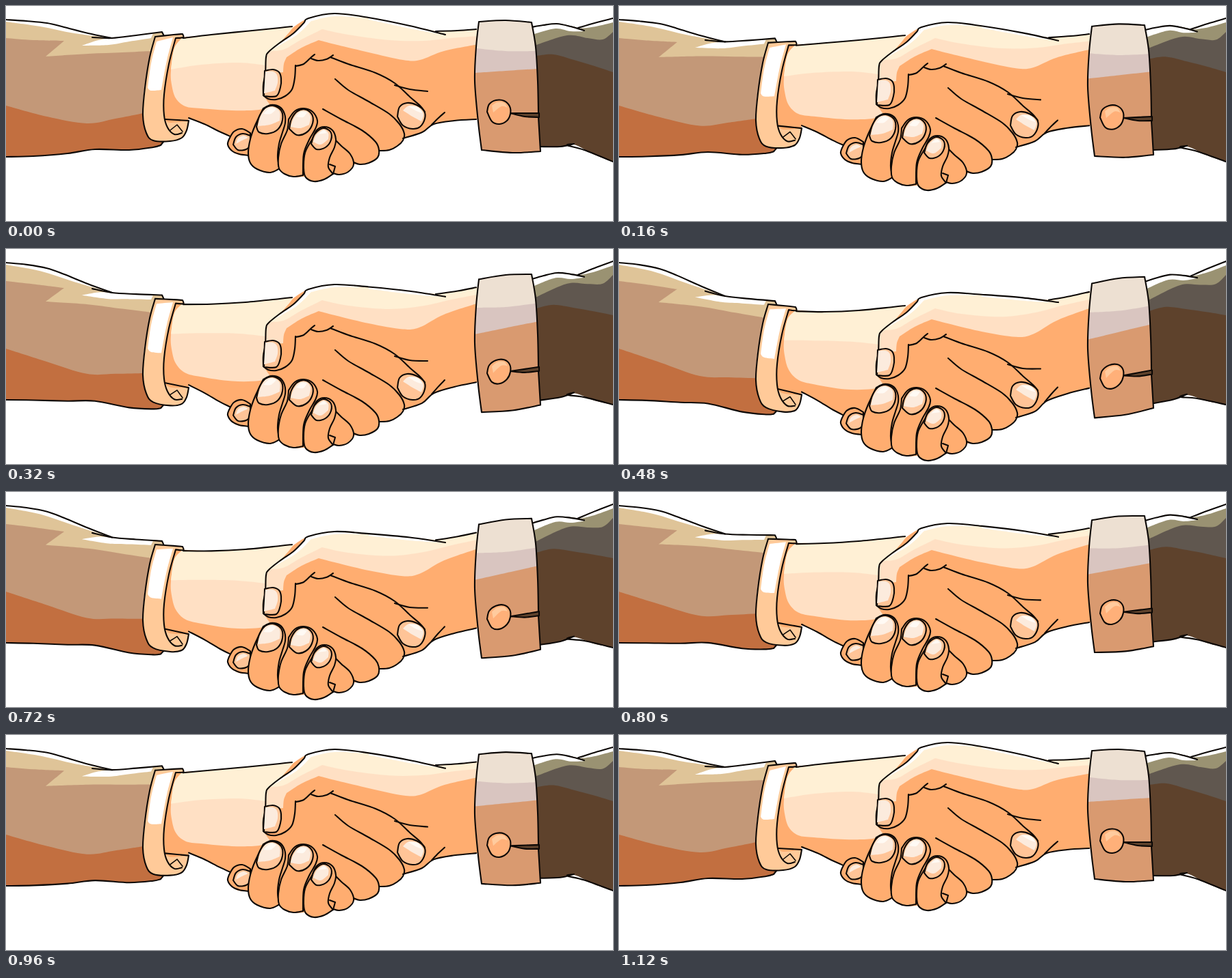
Write an HTML page that moves like this. It is 887 px wide and 315 px high and loops after 1200 ms.

```html
<!DOCTYPE html>
<html lang="en">
<head>
<meta charset="utf-8">
<title>Handshake</title>
<style>
html, body { margin: 0; width: 100%; height: 100%; overflow: hidden; background: #fff; }
svg { display: block; width: 100%; height: 100%; }
path { stroke-linecap: round; stroke-linejoin: round; }
</style>
</head>
<body>
<svg id="stage" viewBox="0 0 887 315"></svg>
<script>
const STEP = 80;
const DROPS = [0, 4, 13, 27, 41, 50, 53, 53, 53, 47, 35, 22, 10, 3, 0];
const stage = document.getElementById('stage');
const shapes = [];
const clamp = v => Math.min(1, Math.max(0, v));

// How strongly a point follows the hands: still at both stage edges, full in the middle.
function follow(x, y) {
  if (x < 350) {
    const k = clamp(x / 350);
    return k * k * (3 - 2 * k);
  }
  return clamp((887 - x) / (380 - 100 * clamp((y - 20) / 110)));
}

// A slash marks a corner; the points between corners form one smooth curve.
function parse(text) {
  let last;
  return text.split('/').map(part => {
    const run = part.trim().split(/\s+/).map(p => p.split(',').map(Number));
    if (last) run.unshift(last);
    last = run[run.length - 1];
    return run;
  });
}

function outline(runs, drop, closed) {
  let d = '';
  for (const run of runs) {
    const p = run.map(([x, y]) => [x, y + drop * follow(x, y)]);
    if (!d) d = 'M' + p[0];
    for (let i = 0; i < p.length - 1; i++) {
      const a = p[i - 1] || p[i], b = p[i], c = p[i + 1], e = p[i + 2] || c;
      const c1 = b.map((v, n) => (v + (c[n] - a[n]) / 6).toFixed(2));
      const c2 = c.map((v, n) => (v - (e[n] - b[n]) / 6).toFixed(2));
      d += `C${c1} ${c2} ${c}`;
    }
  }
  return closed ? d + 'Z' : d;
}

function add(text, fill, width, closed) {
  const el = document.createElementNS('http://www.w3.org/2000/svg', 'path');
  el.setAttribute('fill', fill);
  if (width) {
    el.setAttribute('stroke', '#0c0806');
    el.setAttribute('stroke-width', width);
  }
  stage.append(el);
  shapes.push({ el, closed, runs: parse(text) });
}
const area = (fill, text) => add(text, fill, 0, true);
const solid = (fill, text) => add(text, fill, 2.1, true);
const line = (text, width = 2.1) => add(text, 'none', width, false);
function nail(edge, shine, glint) {
  solid('#ffc497', edge);
  area('#fcebdd', shine);
  if (glint) area('#fffaf4', glint);
}

const SKIN = '#ffad70', MID = '#ffe0c4', PALE = '#fff0d5';

// Left sleeve
area('#c39878', '0,20 30,22 60,25 85,31 120,40 155,47 / 190,43 228,38 / 230,44 218,60 204,110 200,155 206,186 216,197 230,199 / 225,205 215,207 180,211 130,210 90,216 40,220 0,221 /0,20');
area('#dfc498', '0,20 30,22 60,25 85,31 120,40 155,47 / 190,43 228,38 / 230,44 218,50 212,66 / 170,68 120,70 58,74 / 85,51 / 40,50 0,47 / 0,20');
area('#c26f40', '0,146 60,162 118,172 160,165 201,157 / 204,182 216,197 230,199 / 225,205 215,207 180,211 130,210 90,216 40,220 0,221 / 0,146');
area('#fff', '0,20 60,25 120,40 155,47 / 100,40 50,30 0,23 / 0,20');
area('#fff', '111,58 135,50 155,47 190,43 215,40 / 212,47 / 180,52 150,57 111,58');
line('0,20 30,22 60,25 85,31 120,40 155,47');
line('126,46 155,47 190,43 228,38 / 231,44');
line('0,221 40,220 90,216 130,210 180,211 215,207 226,204 / 230,199');

// Both hands in the base skin tone
area(SKIN, '245,47 300,42 350,37 400,32 420,31 / 442,18 480,11 530,17 590,29 630,37 660,36 690,34 / 690,166 / 655,168 625,173 608,185 580,195 / 572,205 560,211 545,212 / 543,222 530,230 508,232 / 500,243 487,247 478,245 / 450,257 436,250 / 420,250 400,240 / 370,240 355,219 / 340,218 328,210 325,196 330,192 / 300,178 267,164 / 262,178 232,176 / 231,130 236,90 245,47');

// Left forearm
area(MID, '257,47 300,42 350,37 400,32 420,31 / 400,54 384,67 380,75 379,100 376,131 / 386,145 / 370,152 330,153 285,150 262,147 248,135 242,115 241,95 246,62 257,47');
area(PALE, '257,47 300,42 350,37 400,32 420,31 / 400,54 384,67 380,75 380,87 / 340,83 285,86 241,93 / 246,62 257,47');
line('259,47 300,42 350,37 400,32 418,30');
line('267,164 290,173 312,184 330,192');

// Left cuff
area('#ffca99', '218,45 245,42 258,41 / 259,46 248,47 / 238,85 231,130 232,165 / 240,171 267,168 / 264,182 257,193 240,198 215,197 205,186 200,160 203,120 210,75 218,45');
area('#fff', '220,52 244,46 / 235,80 227,123 / 212,124 207,120 / 212,84 220,52');
line('218,45 245,42 258,41 / 259,46 248,47 / 238,85 231,130 231,160 236,178 246,188 257,186');
line('218,45 210,75 203,120 200,160 205,186 215,197 240,198 257,193 264,182 267,168');
line('233,166 267,168');
line('240,182 250,174 / 258,184', 1.6);

// Back of the right hand
area(MID, '376,131 376,115 379,98 380,75 384,67 400,54 420,40 435,25 442,18 480,11 530,17 590,29 630,37 660,36 690,34 / 690,56 / 640,66 605,79 580,79 530,68 480,56 457,50 / 432,61 410,75 / 406,85 405,97 / 380,100 / 376,131');
area(PALE, '380,80 384,67 400,54 420,40 435,25 442,18 480,11 530,17 590,29 630,37 660,36 690,34 / 690,44 / 650,47 610,51 560,50 500,42 462,34 / 430,50 405,64 380,66 / 380,80');
area('#fff', '388,64 420,41 442,19 480,12 530,18 / 480,15 446,22 / 424,43 388,64');
area('#fff', '530,17 590,29 642,42 / 600,35 530,20');
line('376,131 376,115 379,98 380,75 384,67 400,54 420,40 435,25 442,18 480,11 530,17 590,29 642,42');
line('628,37 660,36 687,34');
line('687,166 655,168 625,173 608,185 580,194');
line('641,156 632,164 622,174');

// Thumb
line('423,87 422,105 418,122 408,132 395,137 383,136 376,131');
nail('378,95 390,93 399,97 402,106 401,119 395,132 377,132',
     '379,96 390,96 396,101 397,112 393,124 / 377,128');
line('423,88 435,85 446,75 451,71');
line('446,77 456,80 468,78 478,72');

// Fingers of the right hand
line('474,75 500,85 540,98 568,113 590,133 605,146 612,155');
line('568,116 590,122 616,125');
line('481,107 500,123 530,140 560,158 575,173 582,187 580,197 572,205 560,211 545,212');
line('463,151 490,166 520,182 540,199 545,211 543,222 530,230 517,232 508,229');
line('478,193 490,205 503,217 508,232 500,243 487,247 478,245');
nail('572,162 575,148 586,142 600,145 611,154 612,165 605,177 594,180 580,175 572,162',
     '580,153 589,146 602,148 610,158 607,169 / 594,162 580,153',
     '588,147 601,148 609,157 / 600,154 588,147');

// Fingers of the left hand
solid(SKIN, '357,186 345,180 333,184 326,195 / 324,203 330,212 341,217 356,219');
nail('332,203 336,192 346,187 357,190 / 357,203 351,210 339,211 332,203',
     '336,202 339,194 347,190 354,193 / 345,197 336,202');

solid(SKIN, '376,150 387,145 400,148 407,158 408,171 404,185 399,202 397,222 400,238 / 386,244 367,239 357,230 354,215 357,195 364,175 376,150');
nail('366,177 370,162 378,150 390,146 402,153 404,167 397,181 383,187 370,185 366,177',
     '368,176 372,162 380,150 391,148 400,155 400,168 / 385,174 368,176',
     '376,158 386,149 395,151 / 387,158 376,158');

solid(SKIN, '413,166 422,154 435,150 448,155 455,168 452,180 443,196 435,217 434,248 / 420,250 407,246 399,238 398,222 402,202 411,182 413,166');
nail('414,180 417,166 426,154 439,152 448,161 447,175 438,186 425,189 414,180',
     '416,177 420,165 428,155 439,154 445,162 443,174 / 430,179 416,177',
     '424,162 431,155 440,156 / 434,163 424,162');

solid(SKIN, '447,196 454,182 465,177 477,182 482,195 480,207 473,222 471,236 478,246 / 465,254 450,257 438,251 435,238 437,215 447,196');
nail('446,202 451,188 463,179 474,184 475,196 467,207 454,210 446,202',
     '449,199 454,188 464,181 471,186 471,195 / 460,203 449,199',
     '456,188 464,182 469,186 / 456,188');
line('473,232 481,235 / 478,246');

// Right sleeve
area('#5e422c', '768,31 785,28 805,26 825,30 840,33 / 860,25 887,18 / 887,228 / 860,218 830,203 810,206 778,206 / 768,31');
area('#60574f', '768,31 805,26 840,33 / 860,25 887,18 / 887,97 / 860,88 830,79 800,71 775,73 / 768,31');
area('#9a9272', '768,31 805,26 840,33 / 860,25 887,18 / 887,38 / 872,49 850,47 820,43 775,57 / 768,31');
area('#fff', '769,31 785,28 805,26 825,30 845,37 / 825,37 803,33 772,41 / 769,31');
area('#fff', '840,33 860,25 887,18 / 887,24 / 862,30 840,33');
line('768,31 785,28 805,26 825,30 845,36');
line('836,32 860,25 887,18');
line('780,206 810,206 830,202 / 820,204 845,211 887,228');

// Right cuff
const CUFF = '691,23 730,21 768,24 / 774,60 777,110 778,156 / 778,163 / 781,213 / 740,215 695,211 / 690,170 685,110 687,60 691,23';
area('#d99a70', CUFF);
area('#d9c5c0', '691,23 730,21 768,24 / 775,70 776,92 / 730,95 685,98 / 687,60 691,23');
area('#ede0d2', '691,23 730,21 768,24 / 774,66 / 730,66 687,62 / 691,23');
line(CUFF);
solid('#5e422c', '737,157 760,157 779,157 / 779,163 / 758,162 737,157');
solid('#ffb079', '703,155 706,144 716,138 728,139 736,147 737,158 732,168 721,173 710,169 703,155');
area('#ffcb9e', '710,146 718,141 728,142 733,149 / 724,147 712,156 / 710,146');

let shown = -1;
function draw(now) {
  const drop = DROPS[Math.floor(now / STEP) % DROPS.length];
  if (drop !== shown) {
    shown = drop;
    for (const s of shapes) s.el.setAttribute('d', outline(s.runs, drop, s.closed));
  }
}
const start = performance.now();
function tick() {
  draw(performance.now() - start);
  requestAnimationFrame(tick);
}
tick();
</script>
</body>
</html>
```
